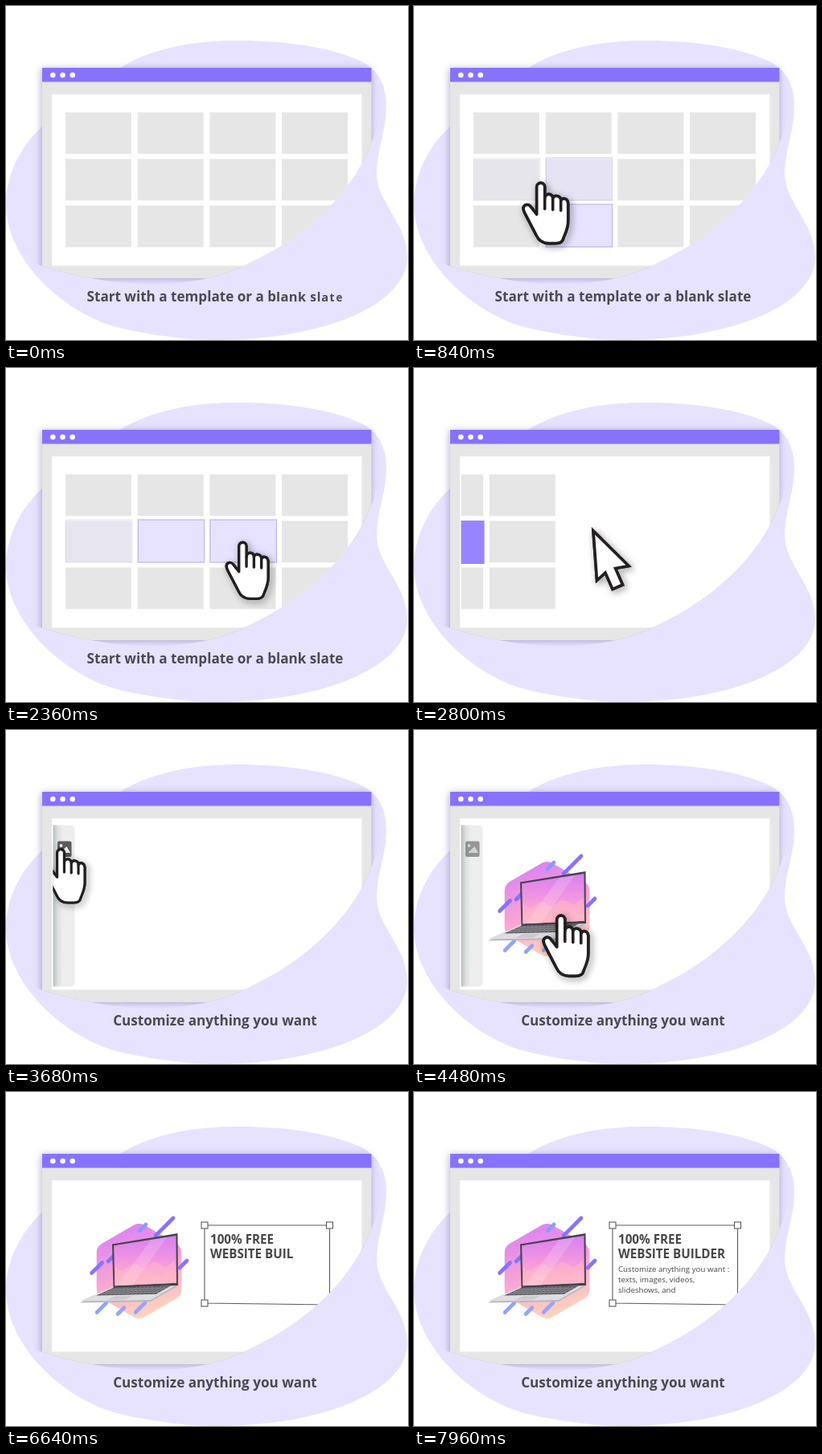
Write an HTML page with a canvas that moves like this. It is 500 px wide and 416 px high and loops after 8 s.

```html
<!DOCTYPE html>
<html lang="en">
<head>
<meta charset="utf-8">
<title>Site builder</title>
<style>
  html, body { margin: 0; width: 100%; height: 100%; overflow: hidden; background: #fff; }
  canvas { display: block; width: 500px; height: 416px; }
</style>
</head>
<body>
<canvas id="stage" width="500" height="416"></canvas>
<script>
const ctx = document.getElementById('stage').getContext('2d');
const LOOP = 8000;
const FONT = '"Open Sans", "Noto Sans", sans-serif';
const INK = '#4a4852', LAVENDER = '#e7e3ff', VIOLET = '#8672ff', GREY = '#e6e6e6';

const clamp = v => Math.max(0, Math.min(1, v));
const span = (t, a, b) => clamp((t - a) / (b - a));
const mix = (a, b, p) => a + (b - a) * p;
const mixPoint = (a, b, p) => [mix(a[0], b[0], p), mix(a[1], b[1], p)];
const outCubic = p => 1 - (1 - p) ** 3;
const inOutCubic = p => p < .5 ? 4 * p ** 3 : 1 - 4 * (1 - p) ** 3;
const inOutQuad = p => p < .5 ? 2 * p * p : 1 - 2 * (1 - p) ** 2;
const outBack = p => 1 + 2.7 * (p - 1) ** 3 + 1.7 * (p - 1) ** 2;

const blob = new Path2D(`M142 77 C185 50 240 43 290 43 C350 43 405 52 440 68
  C465 80 473 100 473 125 C473 155 461 180 461 208 C461 245 499 270 499 313
  C499 370 400 416 260 416 C215 416 150 405 125 396 C60 372 0 310 0 247
  C0 210 18 175 45 150 Z`);
const reveal = new Path2D(`M0 0 H500 V140 H464 C453 190 414 270 295 324
  C225 357 125 352 30 319 H0 Z`);
const hand = new Path2D(`M-5 6 C-5 -1 5 -1 5 6 V20 C6 13 14 13 15 20
  C17 15 25 16 25 23 C27 18 34 20 34 27 V48 C34 58 30 64 28 70
  C27 75 23 76 18 76 H10 C2 76 -3 72 -6 65 L-20 38 C-25 28 -16 25 -12 31 L-5 40 Z`);
const knuckles = new Path2D('M5 20 V33 M15 20 V34 M25 23 V35');
const arrow = new Path2D('M1 3 L5.5 64.5 L16 55 L25 75.5 L37.5 70 L28.5 49.5 L45 46.5 Z');

const cellX = c => 74 + c * 89.7;
const cellY = r => 132.5 + r * 58;
const middle = (c, r) => [cellX(c) + 41, cellY(r) + 26];

const imageTool = [68, 148], textTool = [72, 148.5], imageSpot = [160, 225];
const stops = [
  { at: 600, to: [250, 352] },
  { at: 1000, to: middle(0, 0) },
  { at: 1480, to: middle(3, 0) },
  { at: 1835, to: middle(3, 1) },
  { at: 2100, to: middle(0, 1) },
  { at: 2340, to: middle(2, 1), hold: 200 },
  { at: 2800, to: [222, 200] },
  { at: 3560, to: imageTool, hold: 200 },
  { at: 4400, to: imageSpot },
  { at: 4700, to: [316, 262] },
  { at: 5180, to: textTool, hold: 320 },
  { at: 5880, to: [318, 225] }
];

function pointer(t) {
  const next = stops.findIndex(s => s.at > t);
  if (next < 0) return stops[stops.length - 1].to;
  if (next === 0) return stops[0].to;
  const a = stops[next - 1], b = stops[next];
  return mixPoint(a.to, b.to, inOutQuad(span(t, a.at + (a.hold || 0), b.at)));
}

function layer(draw) {
  ctx.save();
  draw();
  ctx.restore();
}

function fillRect(color, x, y, w, h) {
  ctx.fillStyle = color;
  ctx.fillRect(x, y, w, h);
}

function fillRound(color, x, y, w, h, r) {
  ctx.fillStyle = color;
  ctx.beginPath();
  ctx.roundRect(x, y, w, h, r);
  ctx.fill();
}

function dot(color, x, y, r) {
  ctx.fillStyle = color;
  ctx.beginPath();
  ctx.arc(x, y, r, 0, 7);
  ctx.fill();
}

function poly(points, fill) {
  ctx.beginPath();
  points.forEach(p => ctx.lineTo(...p));
  ctx.closePath();
  if (fill) {
    ctx.fillStyle = fill;
    ctx.fill();
  }
}

function line(color, width, from, to) {
  ctx.strokeStyle = color;
  ctx.lineWidth = width;
  ctx.beginPath();
  ctx.moveTo(...from);
  ctx.lineTo(...to);
  ctx.stroke();
}

function gradient(x0, y0, x1, y1, ...colors) {
  const g = ctx.createLinearGradient(x0, y0, x1, y1);
  colors.forEach((c, i) => g.addColorStop(i / (colors.length - 1), c));
  return g;
}

function shadow(color, blur, x, y) {
  ctx.shadowColor = color;
  ctx.shadowBlur = blur;
  ctx.shadowOffsetX = x;
  ctx.shadowOffsetY = y;
}

function drawWindow() {
  layer(() => {
    shadow('rgba(70,50,130,.38)', 9, -1, 1);
    fillRect(GREY, 45, 77, 409.5, 262);
  });
  fillRect(VIOLET, 45, 77, 409.5, 17.5);
  for (let i = 0; i < 3; i++) dot('#fff', 58.3 + i * 12.2, 86, 3.3);
  fillRect('#fff', 57, 110, 385.5, 213.5);
}

// A cell lights up quickly and stays lit shortly after the pointer leaves.
function hover(t, x, y) {
  let hits = 0;
  for (let age = 0; age < 200; age += 10) {
    const [px, py] = pointer(t - age);
    if (px > x - 3 && px < x + 85 && py > y - 3 && py < y + 55) hits++;
  }
  return Math.min(1, hits / 6);
}

function drawGrid(t) {
  const shift = -380 * inOutCubic(span(t, 2544, 3004));
  for (let c = 0; c < 4; c++) for (let r = 0; r < 3; r++) {
    const x = cellX(c) + shift, y = cellY(r);
    fillRect(GREY, x, y, 82, 51.8);
    layer(() => {
      ctx.globalAlpha = t < 2540 ? hover(t, cellX(c), y) : 0;
      fillRect(LAVENDER, x + .5, y - 1.5, 82.5, 53);
      ctx.strokeStyle = '#b4abec';
      ctx.strokeRect(x + .5, y - 1.5, 82.5, 53);
      ctx.globalAlpha = c === 2 && r === 1 ? span(t, 2400, 2480) : 0;
      fillRect('#9785ff', x - 1, y - .5, 84.5, 54);
    });
  }
}

function drawPhotoIcon() {
  fillRound('#5c5c5c', 64, 138.5, 17.5, 19.5, 2);
  dot('#fff', 68.5, 144, 1.9);
  poly([[67, 153], [75.5, 145], [80, 153]], '#fff');
}

function drawTextIcon() {
  ctx.strokeStyle = '#555';
  ctx.lineWidth = 1.4;
  ctx.strokeRect(66, 143.5, 14, 13);
  ctx.strokeRect(68.5, 146, 9, 8);
  line('#444', 1.6, [70, 148.5], [76, 148.5]);
  line('#444', 1.6, [73, 148], [73, 153]);
}

function drawPanel(t) {
  const open = outCubic(span(t, 3050, 3350)) - inOutCubic(span(t, 5520, 5800));
  if (open <= 0) return;
  layer(() => {
    ctx.translate(-30 * (1 - open), 0);
    fillRound(gradient(58, 0, 71, 0, '#b3baba', '#dde0e0', '#eee'), 58, 118.5, 27.5, 201, [0, 6, 6, 0]);
    ctx.globalAlpha = 1 - span(t, 4400, 4600);
    drawPhotoIcon();
    ctx.globalAlpha = span(t, 4600, 4800);
    drawTextIcon();
  });
}

function drawHexagon(x, y, radius) {
  const corner = i => [x + radius * Math.sin(i * Math.PI / 3), y - radius * Math.cos(i * Math.PI / 3)];
  ctx.beginPath();
  ctx.moveTo(...mixPoint(corner(0), corner(1), .5));
  for (let i = 1; i < 7; i++) ctx.arcTo(...corner(i), ...corner(i + 1), 14);
  ctx.fillStyle = gradient(x - 20, y - radius, x + 20, y + radius, '#da80f6', '#f7a4d4', '#ffdcb8');
  ctx.fill();
}

function drawBar(x, y, reach, color) {
  line(color, 4.6, [x - reach, y + reach], [x + reach, y - reach]);
}

// Maps u, v in 0..1 onto a four-cornered face.
const face = (a, b, c, d) => (u, v) => mixPoint(mixPoint(a, b, u), mixPoint(d, c, u), v);
const patch = (at, u0, v0, u1, v1) => [at(u0, v0), at(u1, v0), at(u1, v1), at(u0, v1)];

function drawScreen() {
  const at = face([132, 189.5], [213.5, 176], [214, 241], [133.5, 244]);
  poly(patch(at, 0, 0, 1, 1), '#45444b');
  layer(() => {
    poly(patch(at, .025, .04, .975, .95));
    ctx.clip();
    poly(patch(at, 0, 0, 1, 1), gradient(0, 180, 0, 242, '#d880f2', '#f497de', '#ffbcc4'));
    for (const base of [.56, .76]) {
      const ridge = [at(1, 1), at(0, 1)];
      for (let u = 0; u <= 1; u += .05) ridge.push(at(u, base + .06 * Math.sin(u * 19 + base * 9)));
      poly(ridge, 'rgba(255,184,200,.55)');
    }
    poly([at(.62, 0), at(.86, 0), at(.28, 1), at(.04, 1)], 'rgba(255,255,255,.17)');
  });
}

function drawBase() {
  const at = face([134, 242], [213.5, 239.5], [180, 259], [92, 260.5]);
  layer(() => {
    ctx.lineJoin = 'round';
    ctx.translate(0, 2);
    poly(patch(at, 0, 0, 1, 1), '#b9b9bd');
    ctx.translate(0, -2);
    poly(patch(at, 0, 0, 1, 1), '#dedee1');
  });
  poly(patch(at, .05, .1, .93, .62), '#55555b');
  for (let i = 1; i < 4; i++) line('#a9a9ae', .6, at(.05, .1 + i * .13), at(.93, .1 + i * .13));
  for (let u = .11; u < .93; u += .063) line('#a9a9ae', .5, at(u, .1), at(u, .62));
  poly(patch(at, .36, .7, .62, .95), '#cacacf');
}

function drawLaptop() {
  ctx.lineCap = 'round';
  drawHexagon(165.5, 223, 61);
  for (let i = 0; i < 3; i++) drawBar(119 + i * 24, 268.5 + i % 2 * 4, 6 - i % 2 * 2, '#93a5fa');
  drawBar(113, 219, 6.5, VIOLET);
  drawBar(131, 207, 4, VIOLET);
  drawBar(170, 169, 4, '#8b9bf8');
  drawBar(197, 168, 11, VIOLET);
  drawBar(220.5, 214.5, 4.5, VIOLET);
  drawBase();
  drawScreen();
}

function drawImage(t) {
  if (t < 3780) return;
  const size = outCubic(span(t, 3780, 4400));
  layer(() => {
    ctx.translate(...(t < 4400 ? pointer(t) : imageSpot));
    ctx.scale(size, size);
    ctx.translate(-imageSpot[0], -imageSpot[1]);
    drawLaptop();
  });
}

function typeLines(text, count, font, y, step) {
  ctx.font = font;
  ctx.fillStyle = '#464549';
  ctx.textAlign = 'left';
  text.slice(0, Math.max(0, count)).split('\n')
    .forEach((row, i) => ctx.fillText(row, 254, y + i * step));
}

function drawTextBox(t) {
  if (t < 5900) return;
  const size = outBack(span(t, 5900, 6240));
  layer(() => {
    ctx.translate(325, 215);
    ctx.scale(size, size);
    const corners = [[-78, -49], [77.5, -49], [77.5, 50], [-78, 48]];
    ctx.strokeStyle = '#5a595e';
    ctx.lineWidth = 1.1;
    poly(corners);
    ctx.stroke();
    for (const [x, y] of corners) {
      fillRect('#fff', x - 4, y - 4, 8, 8);
      ctx.strokeRect(x - 4, y - 4, 8, 8);
    }
  });
  const typed = start => Math.floor((t - start) / 17.6);
  typeLines('100% FREE\nWEBSITE BUILDER', typed(6250), 'bold 15.2px ' + FONT, 188.5, 18);
  typeLines('Customize anything you want :\ntexts, images, videos,\nslideshows, and', typed(6740),
    '9.7px ' + FONT, 224, 13);
}

function press(t) {
  const dips = [2400, 3680, 5430].map(c => clamp(1 - Math.abs(t - c) / 90));
  return 1 - .12 * Math.max(...dips);
}

function drawPointer(t) {
  if (t < 600 || t > 6040) return;
  const isArrow = t > 2560 && t < 3440;
  const shape = isArrow ? arrow : hand;
  layer(() => {
    ctx.translate(...pointer(t));
    ctx.scale(press(t), press(t));
    ctx.globalAlpha = 1 - span(t, 5900, 6040);
    ctx.lineJoin = isArrow ? 'miter' : 'round';
    ctx.lineCap = 'round';
    ctx.strokeStyle = '#231f20';
    ctx.lineWidth = 3.6;
    layer(() => {
      shadow('rgba(0,0,0,.55)', 9, 2.5, 2.5);
      ctx.stroke(shape);
    });
    ctx.fillStyle = '#fff';
    ctx.fill(shape);
    ctx.stroke(shape);
    if (!isArrow) ctx.stroke(knuckles);
  });
}

// Letters grow in one after another, each around its own centre.
function drawCaption(t, text, start, stagger, duration) {
  ctx.font = 'bold 17.1px ' + FONT;
  ctx.fillStyle = INK;
  ctx.textAlign = 'center';
  if (t >= start + stagger * text.length + duration) {
    ctx.fillText(text, 260, 368);
    return;
  }
  const left = 260 - ctx.measureText(text).width / 2;
  [...text].forEach((ch, i) => {
    const begin = start + i * stagger;
    const size = outCubic(span(t, begin, begin + duration));
    if (!size) return;
    const end = left + ctx.measureText(text.slice(0, i + 1)).width;
    layer(() => {
      ctx.translate(end - ctx.measureText(ch).width / 2, 368);
      ctx.scale(size, size);
      ctx.fillText(ch, 0, 0);
    });
  });
}

function drawCaptions(t) {
  if (t < 2760) {
    layer(() => {
      ctx.globalAlpha = 1 - span(t, 2540, 2760);
      drawCaption(t, 'Start with a template or a blank slate', -1430, 30, 800);
    });
  } else {
    drawCaption(t, 'Customize anything you want', 2800, 18, 400);
  }
}

function render(t) {
  fillRect('#fff', 0, 0, 500, 416);
  ctx.fillStyle = LAVENDER;
  ctx.fill(blob);
  layer(() => {
    ctx.clip(reveal);
    drawWindow();
    ctx.beginPath();
    ctx.rect(58.5, 77, 396, 270);
    ctx.clip();
    if (t < 3010) drawGrid(t);
    drawPanel(t);
    drawImage(t);
    drawTextBox(t);
    drawPointer(t);
  });
  drawCaptions(t);
}

const begin = performance.now();
function tick() {
  render((performance.now() - begin) % LOOP);
  requestAnimationFrame(tick);
}
tick();
</script>
</body>
</html>
```
